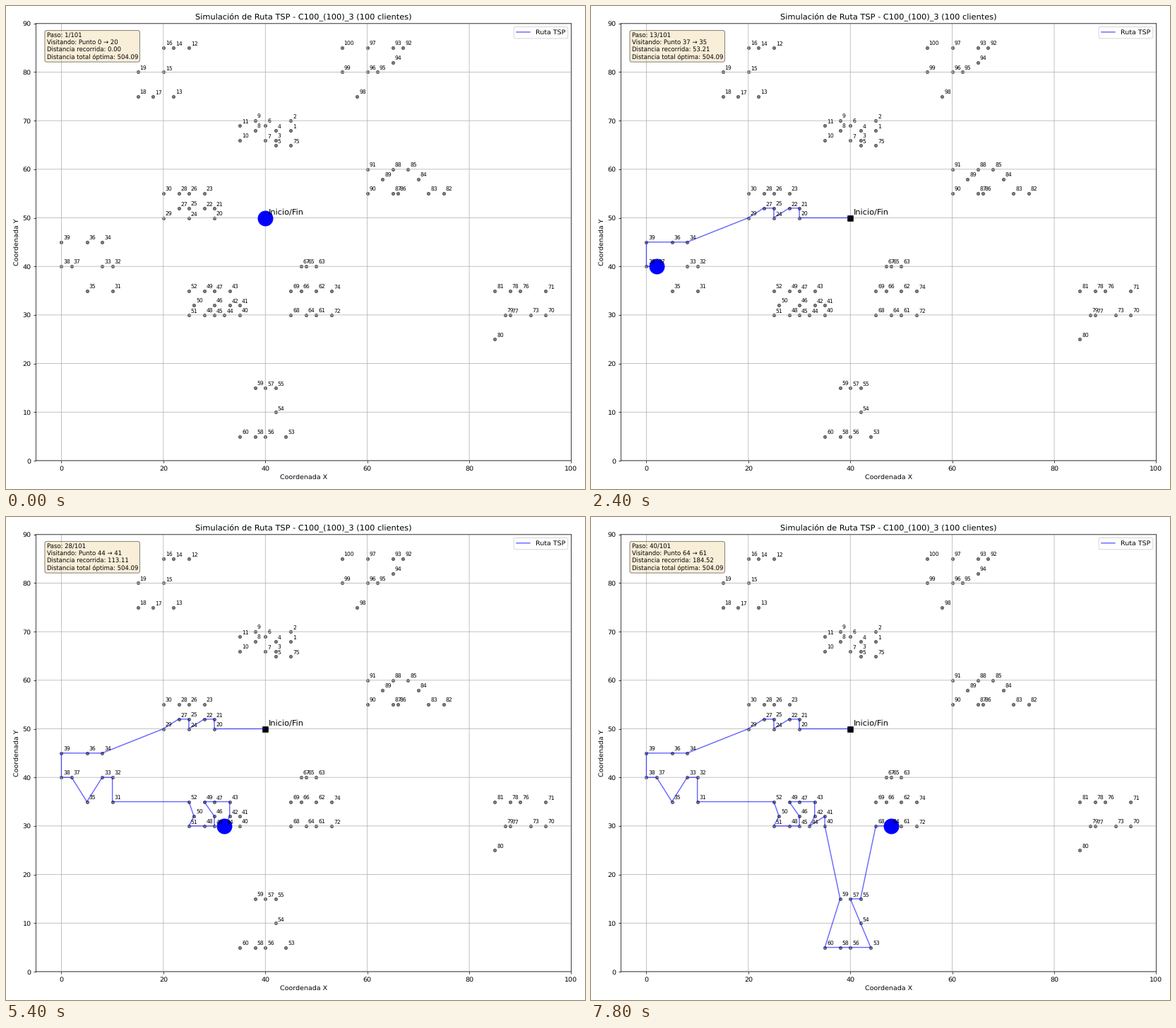
Write a matplotlib script that moves like this. It is 820 px wide and 683 px high and loops after 8000 ms.

```python
import math
import numpy as np
import matplotlib.pyplot as plt
from matplotlib.animation import FuncAnimation

W, H, DPI = 820, 683, 68.33
STEP_MS = 200
TOTAL_STEPS = 101
BEST = 504.09

# Soft, unhinted drawing places text and lines between pixels.
plt.rcParams.update({"text.hinting": "none", "path.snap": False})

points = [(40, 50)]  # the depot is number 0


def add(rows):
    """Number a cluster, given as {y: xs}, from right to left, then upwards."""
    cells = [(x, y) for y, xs in rows.items() for x in xs]
    points.extend(sorted(cells, key=lambda c: (-c[0], c[1])))


add({66: [42], 68: [42, 45], 70: [45]})
add({65: [42], 69: [40]})
add({66: [35, 40], 68: [38], 69: [35], 70: [38]})
add({75: [15, 18, 22], 80: [15, 20], 85: [20, 22, 25]})
add({50: range(20, 31, 5), 52: [23, 25, 28, 30], 55: [20, 23, 25, 28]})
add({35: [5, 10], 40: range(0, 11, 2), 45: [0, 5, 8]} | {40: [0, 2, 8, 10]})
add({30: [25, 28, 30, 32, 35], 32: [26, 30, 33, 35], 35: [25, 28, 30, 33]})
add({5: [35, 38, 40, 44], 10: [42], 15: range(38, 43, 2)})
add({30: [45, 48, 50], 35: [45, 47, 50], 40: [47, 48, 50]})
add({30: [53, 95], 35: [95]})
add({30: [92], 35: [53], 65: [45]})
add({25: [85], 30: [87, 88], 35: [85, 88, 90]})
add({55: [60, 65, 66, 72, 75], 58: [63, 70], 60: [60, 65, 68]})
add({85: [65, 67]})
add({75: [58], 80: [55, 60, 62], 82: [65], 85: [55, 60]})


def shortest_route(groups):
    """Shortest path from the depot that visits each group in turn."""
    def step(cost, way, b):
        return cost + math.dist(points[way[-1]], points[b]), way + [b]

    ends = [(0.0, [0])]
    for group in groups:
        layer = {(frozenset([b]), b): min(step(*e, b) for e in ends)
                 for b in group}
        for _ in range(len(group) - 1):
            grown = {}
            for (seen, _), entry in layer.items():
                for b in set(group) - seen:
                    key, new = (seen | {b}, b), step(*entry, b)
                    grown[key] = min(new, grown.get(key, new))
            layer = grown
        ends = list(layer.values())
    return min(ends)[1]


route = shortest_route([
    [20, 21, 22, 24, 25, 27, 29], range(31, 40), range(45, 53),
    [42, 43], [44], [40, 41], range(53, 61), [64, 68], [61]])
path = np.array([points[i] for i in route], float)
legs = np.hypot(*np.diff(path, axis=0).T)
travelled = np.concatenate([[0], np.cumsum(legs)])

fig = plt.figure(figsize=((W + 0.01) / DPI, (H + 0.01) / DPI), dpi=DPI)
left, right, top, bottom = 42.35, 800.45, 24.8, 642.95
ax = fig.add_axes([left / W, 1 - bottom / H,
                   (right - left) / W, (bottom - top) / H])
ax.set(xlim=(-5, 100), ylim=(0, 90),
       xlabel="Coordenada X", ylabel="Coordenada Y",
       title="Simulación de Ruta TSP - C100_(100)_3 (100 clientes)")
ax.grid(True)


def label(text, p, gap, size):
    ax.annotate(text, p, xytext=(gap, gap), textcoords="offset points",
                fontsize=size)


ax.scatter(*zip(*points[1:]), s=20, c="black", alpha=0.5)
for i, p in enumerate(points[1:], 1):
    label(str(i), p, 3, 8)
ax.scatter(*points[0], s=64, c="black", marker="s", linewidths=1, zorder=2)
label("Inicio/Fin", points[0], 5, 12)

trail, = ax.plot([], [], "b-", alpha=0.6, label="Ruta TSP")
vehicle = ax.scatter(*points[0], s=490, c="blue", zorder=2.5)
info = ax.text(0.02, 0.98, "", transform=ax.transAxes, va="top", fontsize=9,
               bbox=dict(boxstyle="round", facecolor="wheat", alpha=0.5))
ax.legend(loc="upper right")


def update(k):
    trail.set_data(*path[:k + 1].T)
    vehicle.set_offsets(path[k:k + 1])
    info.set_text(f"Paso: {k + 1}/{TOTAL_STEPS}\n"
                  f"Visitando: Punto {route[k]} → {route[k + 1]}\n"
                  f"Distancia recorrida: {travelled[k]:.2f}\n"
                  f"Distancia total óptima: {BEST}")
    return trail, vehicle, info


anim = FuncAnimation(fig, update, frames=len(route) - 1, interval=STEP_MS,
                     repeat=True, repeat_delay=0)
plt.show()
```
